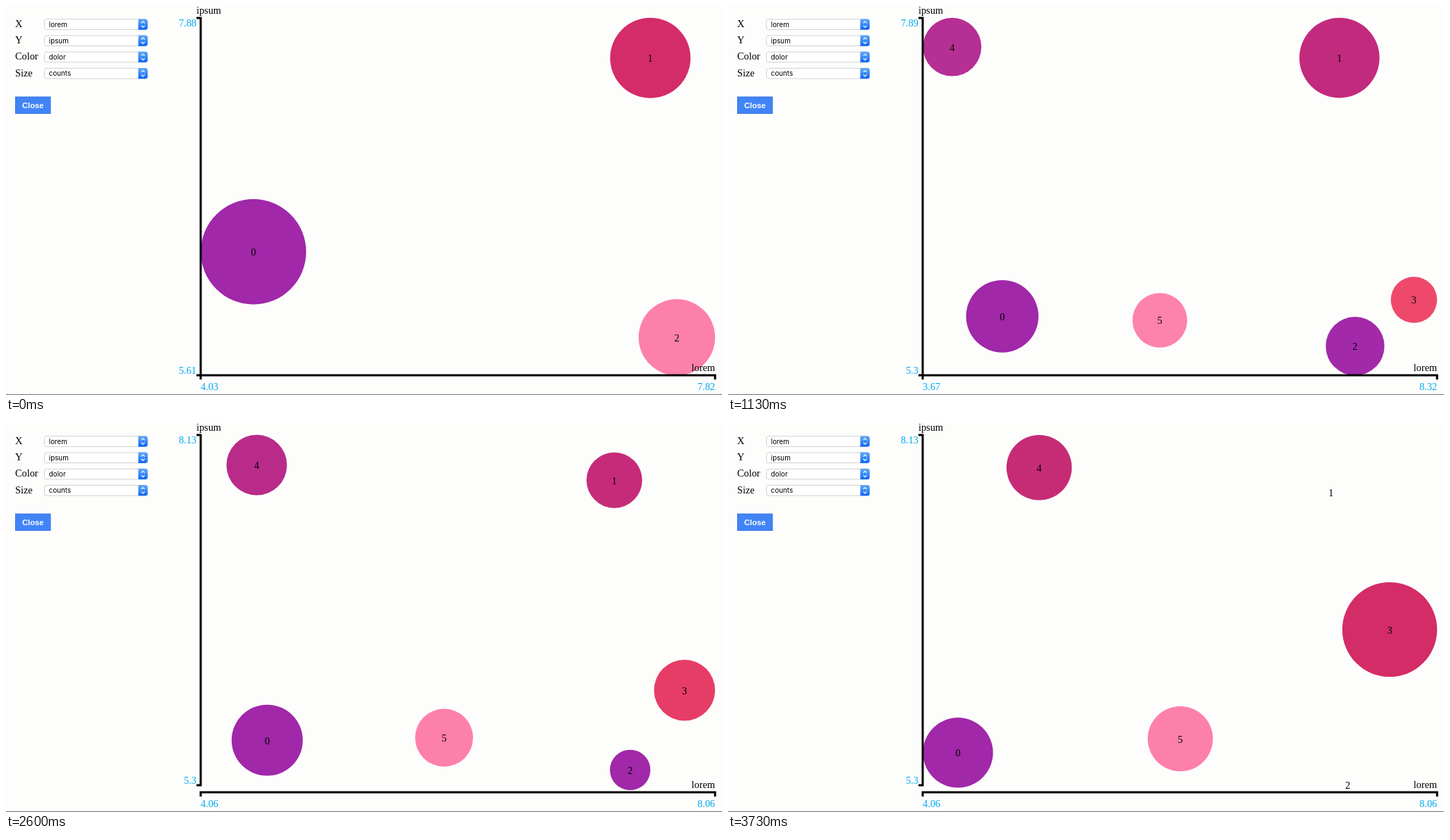
An HTML page that plays this animation: 1015 by 552 pixels, repeating every 3790 ms.

```html
<!DOCTYPE html>
<html lang="en">
<head>
<meta charset="utf-8">
<title>Bubble chart</title>
<style>
  html, body { margin: 0; width: 100%; height: 100%; overflow: hidden; background: #fdfdfc; }
  svg { display: block; width: 100%; height: 100%; }
  text { font: 14.3px "Liberation Serif", "Times New Roman", serif; }
  .axis path { fill: none; stroke: #000; stroke-width: 3; }
  .range { fill: #03a9f0; }
  .end { text-anchor: end; }
  .bubble text { text-anchor: middle; }
  .option { font: 9.8px Inter, sans-serif; }
  .button { font: bold 11.2px "Liberation Sans", Arial, sans-serif; fill: #fff; text-anchor: middle; }
</style>
</head>
<body>
<svg viewBox="0 0 1015 552">
  <defs>
    <linearGradient id="knob" x2="0" y2="1">
      <stop stop-color="#62aaf8"/>
      <stop offset="1" stop-color="#0f67f5"/>
    </linearGradient>
  </defs>
  <g id="form"></g>
  <rect x="13.5" y="129" width="49.5" height="23.5" fill="#4184f6" stroke="#3575e4"/>
  <text class="button" x="38.2" y="145">Close</text>
  <g id="bubbles"></g>
  <g class="axis">
    <path id="yLine"/>
    <path d="M276 530V524H1005.2V530"/>
    <text x="270" y="11">ipsum</text>
    <text class="end" x="1005.2" y="518">lorem</text>
    <text class="range end" id="yMax" x="270" y="29"/>
    <text class="range end" id="yMin" x="270"/>
    <text class="range" id="xMin" x="276" y="545"/>
    <text class="range end" id="xMax" x="1005.2" y="545"/>
  </g>
  <path d="M0 551.5H1015" stroke="#66776f"/>
</svg>
<script>
const LOOP = 3790, STEP = 1000 / 15;
const MOVE_STARTS = [186, 2186], MOVE_TIME = 1060;
const AXIS_DELAY = 24;

const axes = [
  { xMin: '4.03', xMax: '7.82', yMin: '5.61', yMax: '7.88', bottom: 524 },
  { xMin: '3.67', xMax: '8.32', yMin: '5.3', yMax: '7.89', bottom: 524 },
  { xMin: '4.06', xMax: '8.06', yMin: '5.3', yMax: '8.13', bottom: 514 }
];

// Each pose: x, y, radius, rgb colour; null means not present yet.
const purple = [160, 40, 169], pink = [253, 128, 171];
const bubbles = [
  [[350.8, 348.8, 74.7, purple], [389.7, 442.4, 50.8, purple], [326, 467.8, 49.7, purple]],
  [[913.4, 73.7, 57, [212, 44, 104]], [865.7, 73.6, 56.8, [194, 42, 126]], [854.8, 98.5, 0, [208, 46, 108]]],
  [[951, 470.2, 54.2, pink], [887.5, 483, 41.3, purple], [878.6, 513.6, 0, purple]],
  [null, [972.4, 417, 32.8, [238, 69, 104]], [938, 293.1, 67.2, [211, 44, 102]]],
  [null, [317.8, 58.2, 41.4, [180, 43, 146]], [441.1, 63.2, 46.3, [198, 44, 118]]],
  [null, [612.2, 446, 38.8, pink], [641.2, 448.1, 46.2, pink]]
];

const byId = id => document.getElementById(id);
const mix = (a, b, p) => a + (b - a) * p;
const ease = t => t < 0.5 ? 2 * t * t : 1 - 2 * (1 - t) ** 2;

function add(parent, tag, attrs, text = '') {
  const node = document.createElementNS('http://www.w3.org/2000/svg', tag);
  for (const name in attrs) node.setAttribute(name, attrs[name]);
  node.textContent = text;
  return parent.appendChild(node);
}

[['X', 'lorem'], ['Y', 'ipsum'], ['Color', 'dolor'], ['Size', 'counts']].forEach(([name, option], i) => {
  const row = add(byId('form'), 'g', { transform: `translate(0 ${26 + i * 23.2})` });
  add(row, 'text', { x: 13, y: 4 }, name);
  add(row, 'rect', { x: 54.5, y: -7.2, width: 146, height: 14.6, rx: 3, fill: '#fff', stroke: '#d2d2d2' });
  add(row, 'path', { d: 'M187.5 -7.6H197.5Q200.8 -7.6 200.8 -4.3V4.4Q200.8 7.7 197.5 7.7H187.5Z', fill: 'url(#knob)' });
  add(row, 'path', { d: 'M191.8 -1.7L194.2 -4.1L196.6 -1.7M191.8 1.8L194.2 4.2L196.6 1.8', fill: 'none', stroke: '#fff', 'stroke-width': 1.2 });
  add(row, 'text', { class: 'option', x: 60.8, y: 3.6 }, option);
});

const groups = bubbles.map((_, i) => {
  const group = add(byId('bubbles'), 'g', { class: 'bubble' });
  const circle = add(group, 'circle', {});
  add(group, 'text', { y: 5.4 }, i);
  return { group, circle };
});

function drawAxes({ bottom, ...labels }) {
  for (const id in labels) byId(id).textContent = labels[id];
  byId('yMin').setAttribute('y', bottom - 2.5);
  byId('yLine').setAttribute('d', `M270 17H276V${bottom}H270`);
}

function drawBubble({ group, circle }, from, to, p) {
  const start = from || to;
  const [x, y, r] = [0, 1, 2].map(k => mix(start[k], to[k], p));
  const color = to[3].map((c, k) => Math.round(mix(start[3][k], c, p)));
  group.setAttribute('transform', `translate(${x} ${y})`);
  group.setAttribute('opacity', from ? 1 : p);
  circle.setAttribute('r', r);
  circle.setAttribute('fill', `rgb(${color})`);
}

function draw(time) {
  const move = time < MOVE_STARTS[1] ? 0 : 1;
  const elapsed = time - MOVE_STARTS[move];
  const p = ease(Math.min(1, Math.max(0, elapsed / MOVE_TIME)));
  drawAxes(axes[elapsed > AXIS_DELAY ? move + 1 : move]);
  groups.forEach((node, i) => drawBubble(node, bubbles[i][move], bubbles[i][move + 1], p));
}

// The picture advances on a 15 fps grid; the small lead absorbs clock rounding.
const origin = performance.now();
function tick() {
  const time = (performance.now() - origin) % LOOP;
  draw(Math.floor((time + 4) / STEP) * STEP);
  requestAnimationFrame(tick);
}
tick();
</script>
</body>
</html>
```
